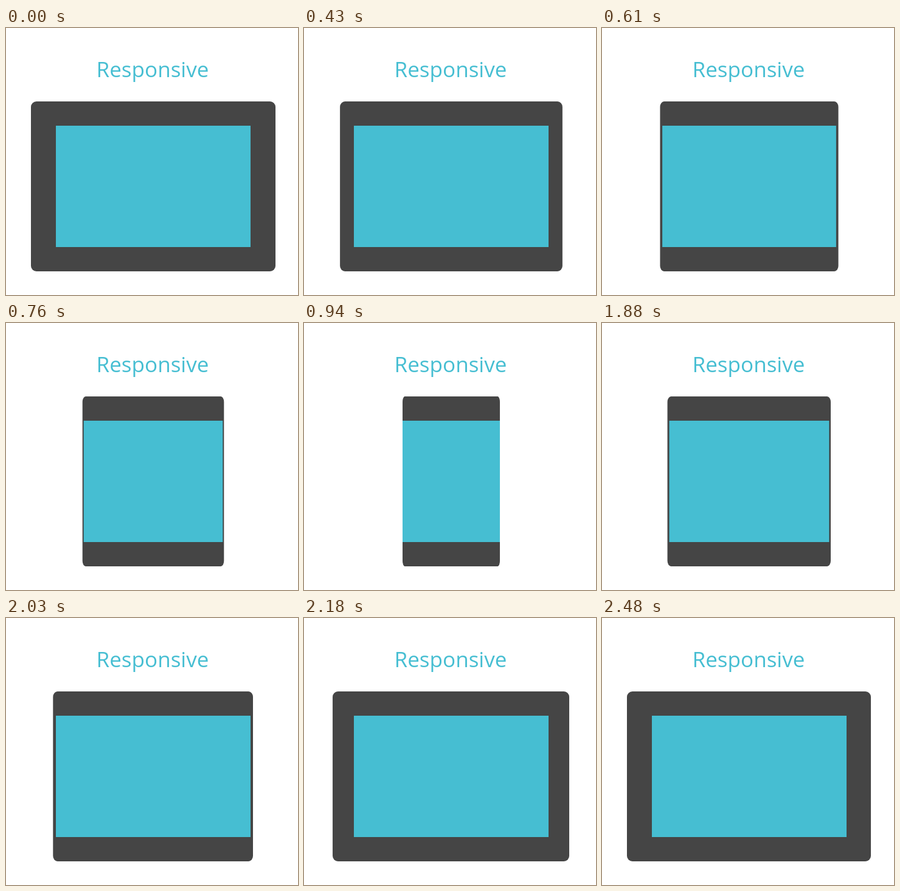
These frames come from a looping animation (480x440 px, 2510 ms). An HTML page:

```html
<!DOCTYPE html>
<html lang="en">
<head>
<meta charset="utf-8">
<title>Responsive</title>
<style>
  html, body { margin: 0; width: 100%; height: 100%; overflow: hidden; background: #fff; }
  svg { display: block; }
  text { font: 35px "Open Sans", "Noto Sans", sans-serif; fill: #46bed2; }
  #body { fill: #454545; }
  #screen { fill: #46bed2; }
</style>
</head>
<body>
<svg width="480" height="440" viewBox="0 0 480 440">
  <text x="148.6" y="81">Responsive</text>
  <rect id="body" y="121" height="280" ry="9"/>
  <rect id="screen" y="161" height="200"/>
</svg>
<script>
const LOOP = 2510, STEP = 30, STEPS = 20;
const PHONE = 160, TABLET = 402, SCREEN = 320;
const body = document.getElementById('body');
const screenRect = document.getElementById('screen');

const stepsSince = (t, start) =>
  Math.max(0, Math.min(STEPS, Math.floor((t - start) / STEP)));
const mix = (a, b, p) => a + (b - a) * p;

function place(rect, center, width) {
  rect.setAttribute('x', center - width / 2);
  rect.setAttribute('width', width);
}

function draw(t) {
  const growing = t >= 1610;
  const open = growing ? stepsSince(t, 1610) : STEPS - stepsSince(t, 340);
  const p = open / STEPS;
  // The regrown tablet stays one pixel short on the right until the loop restarts.
  const full = growing ? TABLET - 1 : TABLET;
  const width = mix(PHONE, full, p);
  place(body, growing ? 242 - p / 2 : 242, width);
  body.setAttribute('rx', 9 * width / TABLET);
  // The screen reaches its maximum width before the case does.
  place(screenRect, 242, mix(PHONE, SCREEN, Math.min(1, open / 14)));
}

const start = performance.now();
function tick() {
  draw((performance.now() - start) % LOOP);
  requestAnimationFrame(tick);
}
draw(0);
requestAnimationFrame(tick);
</script>
</body>
</html>
```
